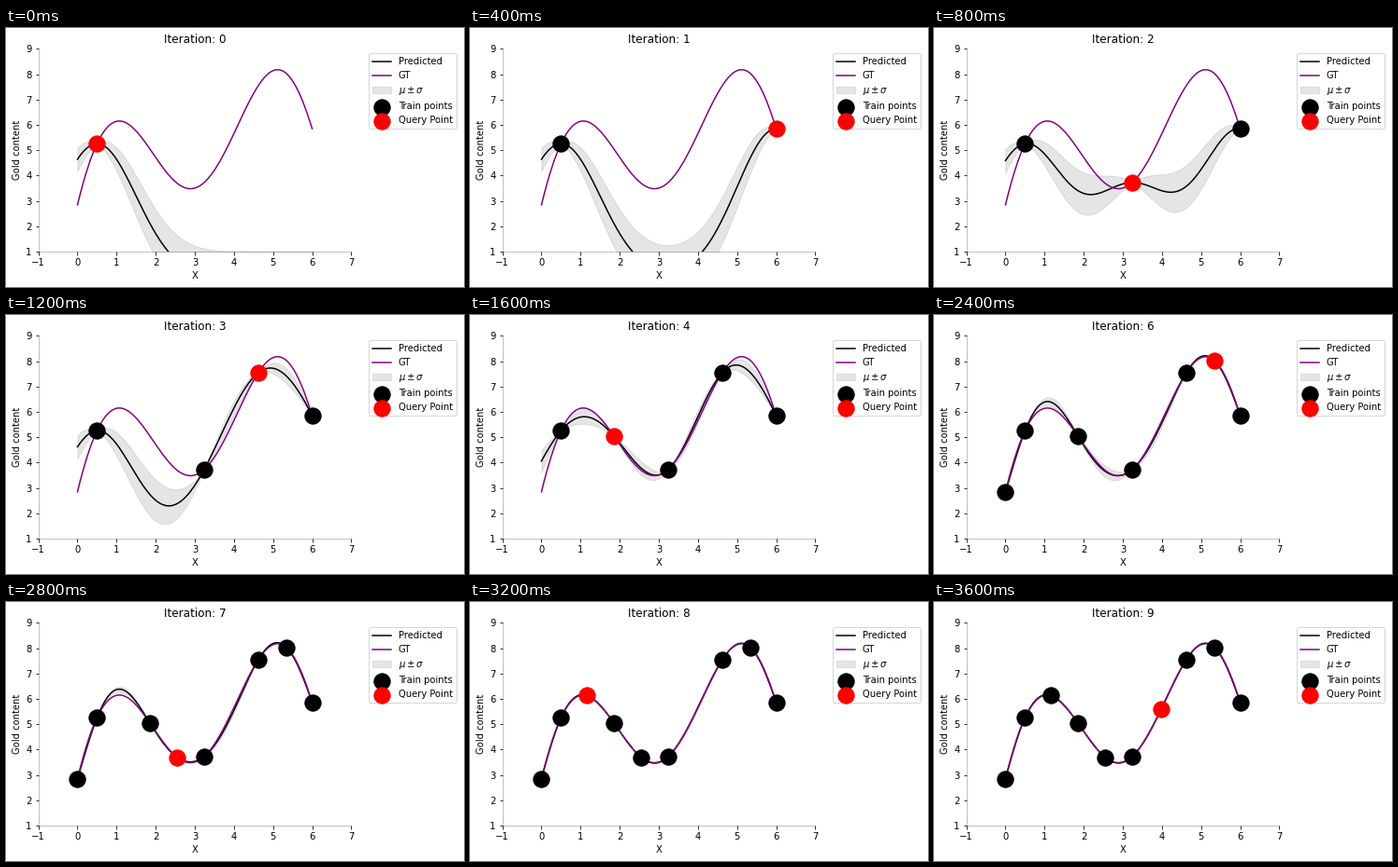
These frames come from a looping animation (490x278 px, 4000 ms). A matplotlib script:

```python
import numpy as np
import matplotlib.pyplot as plt
from matplotlib.animation import FuncAnimation

W, H, DPI = 490, 278, 72
plt.rcParams.update({"font.family": "DejaVu Sans", "font.size": 10})

# Ground truth: a smooth polynomial through a few anchors
ANCHOR_X = [0, 0.5, 1.07, 1.16, 1.86, 2.55, 2.88, 3.24, 3.98, 4.62, 5.11, 5.34, 6]
ANCHOR_Y = [2.84, 5.26, 6.15, 6.13, 5.04, 3.68, 3.47, 3.75, 5.58, 7.55, 8.18, 8.03, 5.85]
truth = np.polynomial.Polynomial.fit(ANCHOR_X, ANCHOR_Y, 8)

QUERIES = np.array([0.5, 6, 3.24, 4.62, 1.86, 0, 5.34, 2.55, 1.16, 3.98])
GRID = np.linspace(0, 6, 600)


def kernel(a, b):
    return np.exp(-0.5 * (a[:, None] - b[None, :]) ** 2)


def posterior(x):
    """Zero-mean Gaussian process fitted to the truth at x."""
    gain = np.linalg.solve(kernel(x, x) + 1e-10 * np.eye(len(x)), kernel(x, GRID))
    var = 1 - np.sum(kernel(x, GRID) * gain, axis=0)
    return truth(x) @ gain, np.sqrt(np.clip(var, 0, None))


def draw_band(mu, sd):
    return ax.fill_between(GRID, mu - sd, mu + sd, color="gray", alpha=0.2,
                           label=r"$\mu \pm \sigma$")


fig = plt.figure(figsize=(W / DPI, H / DPI), dpi=DPI, facecolor="white")
ax = fig.add_axes([34.6 / W, 38.1 / H, 334.8 / W, 217.44 / H])
ax.set(xlim=(-1, 7), ylim=(1, 9), xticks=range(-1, 8), yticks=range(1, 10),
       xlabel="X", ylabel="Gold content")
for side in ("top", "right"):
    ax.spines[side].set_visible(False)
for side in ("left", "bottom"):
    ax.spines[side].set_alpha(0.3)
title = ax.set_title("Iteration: 0")

mean, spread = posterior(QUERIES[:1])
pred, = ax.plot(GRID, mean, color="black", label="Predicted")
gt, = ax.plot(GRID, truth(GRID), color="purple", label="GT")
band = draw_band(mean, spread)
train = ax.scatter([], [], s=300, color="black", zorder=10, label="Train points")
query = ax.scatter([], [], s=300, color="red", zorder=11, label="Query Point")
ax.legend(handles=[pred, gt, band, train, query], loc="upper left",
          bbox_to_anchor=(1.04, 1))


def update(i):
    global band
    x = QUERIES[:i + 1]
    points = np.column_stack([x, truth(x)])
    mu, sd = posterior(x)
    pred.set_ydata(mu)
    band.remove()
    band = draw_band(mu, sd)
    train.set_offsets(points[:-1])
    query.set_offsets(points[-1:])
    title.set_text(f"Iteration: {i}")
    return pred, band, train, query, title


anim = FuncAnimation(fig, update, frames=len(QUERIES), interval=400,
                     init_func=lambda: update(0), repeat=True, repeat_delay=0)
plt.show()
```
